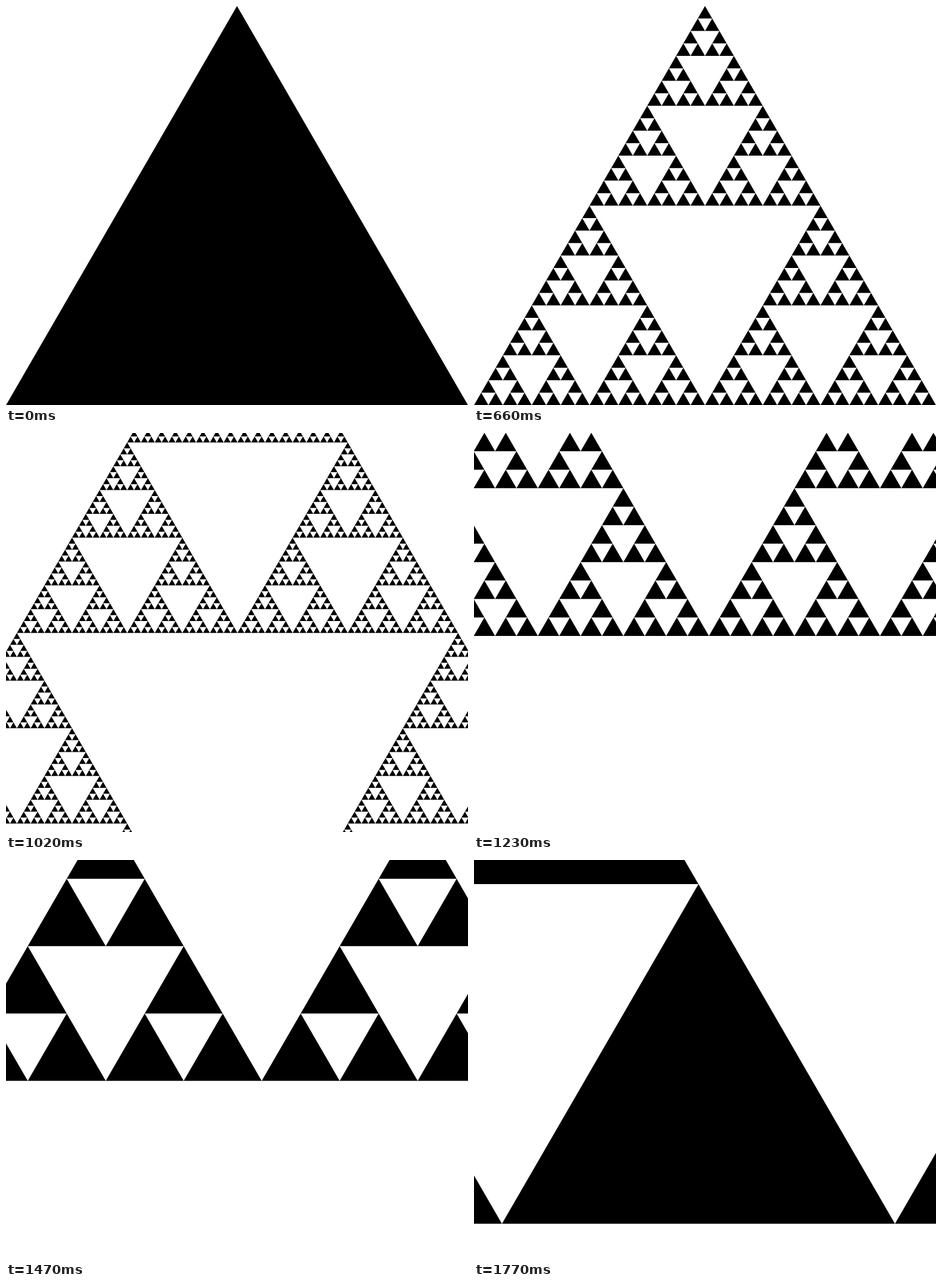
Write an HTML page with a canvas that moves like this. It is 804x696 px and loops after 1.8 s.

```html
<!DOCTYPE html>
<html lang="en">
<head>
<meta charset="utf-8">
<title>Sierpinski triangle</title>
<style>
  html, body { margin: 0; width: 100%; height: 100%; overflow: hidden; background: #fff; }
  canvas { display: block; }
</style>
</head>
<body>
<canvas id="stage" width="804" height="696"></canvas>
<script>
const ctx = document.getElementById('stage').getContext('2d');
const W = 804, H = 696;
const RATIO = Math.sqrt(3) / 2;
const DEPTH = 7;    // subdivisions, and doublings in the zoom
const TICK = 30;    // ms per picture
const HALF = 30;    // ticks for each half of the loop

// Add a triangle (apex x, y and side) to the path, split depth times.
function addTriangle(x, y, side, depth) {
  const h = side * RATIO, r = side / 2;
  if (x + r < 0 || x - r > W || y + h < 0 || y > H) return;
  if (depth === 0) {
    ctx.moveTo(x, y);
    ctx.lineTo(x + r, y + h);
    ctx.lineTo(x - r, y + h);
    ctx.closePath();
    return;
  }
  addTriangle(x, y, r, depth - 1);
  addTriangle(x - r / 2, y + h / 2, r, depth - 1);
  addTriangle(x + r / 2, y + h / 2, r, depth - 1);
}

function draw(ms) {
  const tick = Math.floor(ms / TICK) % (2 * HALF);
  const depth = Math.min(DEPTH, Math.floor(DEPTH * tick / HALF));
  const u = Math.max(0, tick - HALF) / HALF;
  const scale = 2 ** (DEPTH * u);

  // The view centre drifts onto one of the smallest triangles.
  const drift = scale * u / 2 ** DEPTH;
  const side = W * scale;
  const midX = W / 2 * (1 + drift);
  const midY = W * RATIO / 2 * (1 + drift);

  ctx.fillStyle = '#fff';
  ctx.fillRect(0, 0, W, H);
  ctx.fillStyle = '#000';
  ctx.beginPath();
  addTriangle(midX, midY - side * RATIO / 2, side, depth);
  ctx.fill();
}

const start = performance.now();
function loop() {
  draw(performance.now() - start);
  requestAnimationFrame(loop);
}
loop();
</script>
</body>
</html>
```
